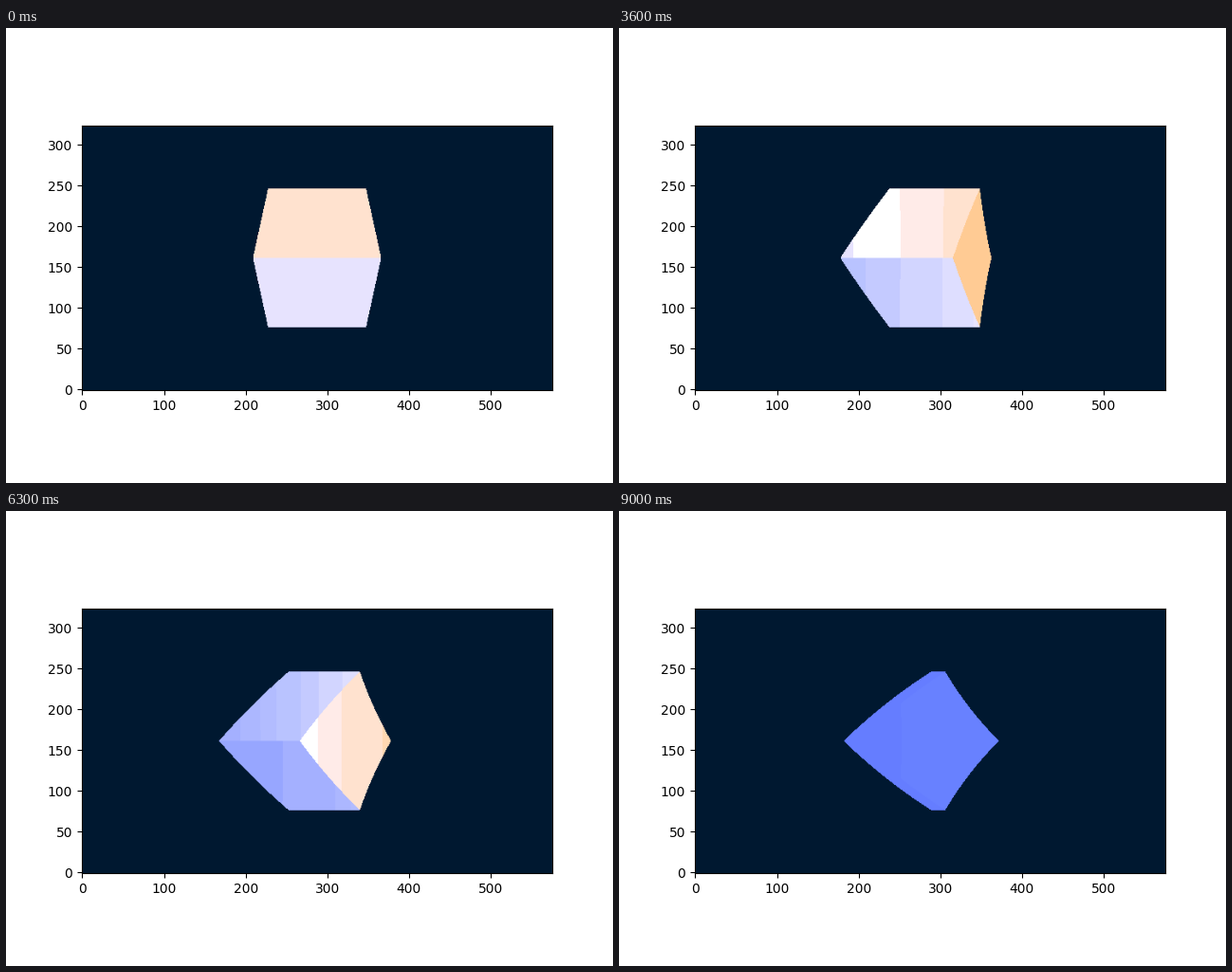
A matplotlib script for the animation above (9.9 s loop, 640 by 480 pixels).

```python
"""A cube flying past to the left at rising fractions of light speed."""
import numpy as np
import matplotlib.pyplot as plt
from matplotlib.animation import FuncAnimation
from matplotlib.colors import to_rgb

W, H = 576, 324
FOCAL = 360
DIST = 3.0
HALF = 0.5
FRAMES, INTERVAL = 11, 900

# Rest temperatures: right, lower and upper face
FACE_TEMP = np.array([4630, 7000, 5700])

# Upper temperature limit of each glow colour
LIMITS = [5000, 5500, 6107, 6467, 6850, 7204, 7510, 7945, 8290,
          8746, 9040, 9395, 10590, 13300, 16000, 20000, 36000]
GLOW = ["#ffcb94", "#ffd8b2", "#ffe2cf", "#ffebe8", "#ffffff", "#e7e3fe",
        "#dedeff", "#d2d5ff", "#c4caff", "#b9c3ff", "#b2bcff", "#acb7ff",
        "#a4b0ff", "#97a6ff", "#8a9bff", "#7b8fff", "#6881ff", "#657dff"]
SPACE = "#001830"


def rgb8(color):
    return np.round(np.array(to_rgb(color)) * 255).astype(np.uint8)


PALETTE = np.array([rgb8(c) for c in GLOW])

# Unit view direction of every pixel
u, v = np.meshgrid((np.arange(W) - (W - 1) / 2) / FOCAL,
                   (np.arange(H) - (H - 1) / 2) / FOCAL)
norm = np.sqrt(u**2 + v**2 + 1)
NX, NY, NZ = u / norm, v / norm, 1 / norm


def render(beta):
    gamma = 1 / np.sqrt(1 - beta**2)
    r2 = np.sqrt(2)

    # Light rays in the cube's rest frame, tilted 45 degrees about x
    rays = np.stack([gamma * (NX - beta), (NY + NZ) / r2, (NY - NZ) / r2])
    start = np.array([gamma * beta * DIST, -DIST / r2, DIST / r2])
    start = start[:, None, None]

    t1, t2 = (-HALF - start) / rays, (HALF - start) / rays
    near, far = np.minimum(t1, t2), np.maximum(t1, t2)
    hit = near.max(axis=0) < far.min(axis=0)
    face = near.argmax(axis=0)

    temp = FACE_TEMP[face] * gamma * (1 - beta * NX)
    image = PALETTE[np.digitize(temp, LIMITS)]
    image[~hit] = rgb8(SPACE)
    return image


def update(i):
    picture.set_data(render(min(i / 10, 0.99)))
    return [picture]


fig, ax = plt.subplots(figsize=(6.4, 4.8), dpi=100)
picture = ax.imshow(render(0), origin="lower")
anim = FuncAnimation(fig, update, frames=FRAMES, interval=INTERVAL,
                     repeat=True, repeat_delay=0)
plt.show()
```
